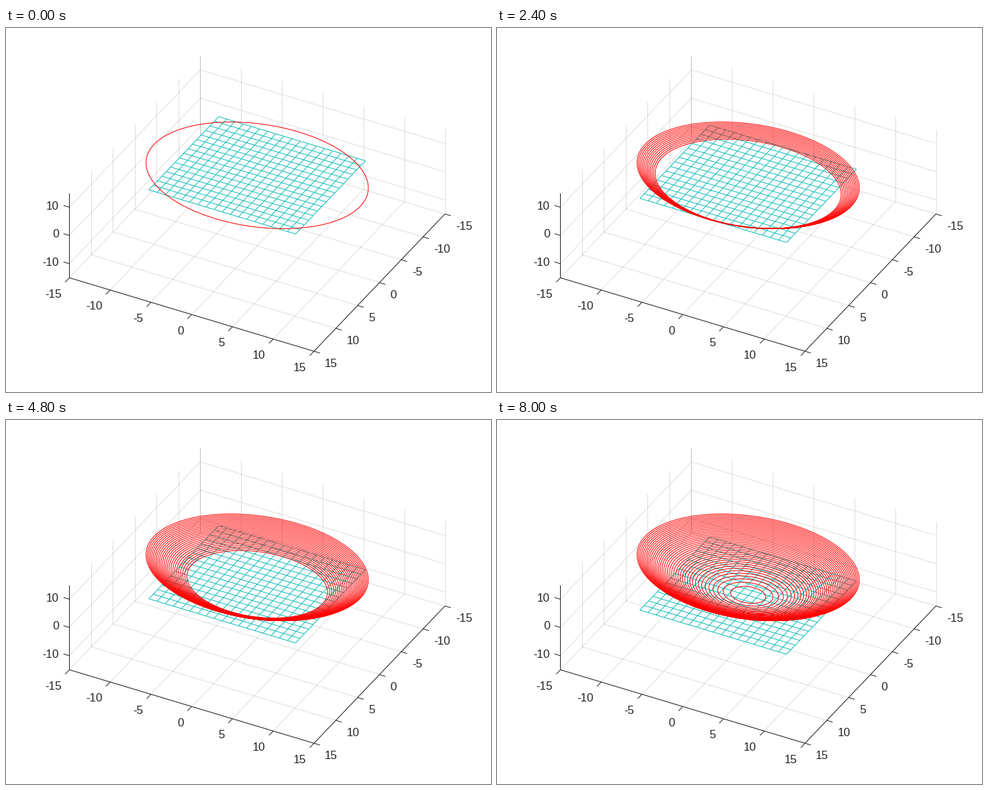
A matplotlib script that plays this animation: 700x525 px, repeating every 8.2 s.

```python
import numpy as np
import matplotlib.pyplot as plt
from matplotlib.animation import FuncAnimation
from matplotlib.collections import LineCollection
from matplotlib.patches import Polygon

W, H, DPI = 700, 525, 100
PX = 72 / DPI
LIM = 15
STEPS = 41
TOP, DZ = 10, 0.25

INK, RED, TEAL = "#262626", "#ff0000", "#12beb9"

# Screen directions of the x, y and z axes, in pixels per unit
ORIGIN = np.array([362.5, 253.2])
EX = np.array([11.767, 3.533])
EY = np.array([-6.3, 6.6])
EZ = np.array([0, -4.07])


def project(x, y, z):
    x, y, z = (np.asarray(v, float)[..., None] for v in (x, y, z))
    return ORIGIN + x * EX + y * EY + z * EZ


def segment(p, q):
    return np.array([project(*p), project(*q)])


fig = plt.figure(figsize=(W / DPI, H / DPI), dpi=DPI, facecolor="white")
ax = fig.add_axes([0, 0, 1, 1])
ax.set_xlim(0, W)
ax.set_ylim(H, 0)
ax.axis("off")


def add_lines(segs, color, width=1.0, **kw):
    lines = LineCollection(segs, colors=color, linewidths=width * PX, **kw)
    ax.add_collection(lines, autolim=False)
    return lines


def label(pos, value, align):
    ax.text(*pos, str(value), ha=align, va="center_baseline", color=INK,
            family="Liberation Sans", fontsize=16.67 * PX, zorder=6)


# Grid on the floor and the two back walls
ticks = range(-LIM, LIM + 1, 5)
zticks = (-10, 0, 10)
grid = []
for t in ticks:
    grid += [
        segment((t, -LIM, -LIM), (t, LIM, -LIM)),
        segment((-LIM, t, -LIM), (LIM, t, -LIM)),
        segment((t, -LIM, -LIM), (t, -LIM, LIM)),
        segment((-LIM, t, -LIM), (-LIM, t, LIM)),
    ]
for t in zticks:
    grid += [
        segment((-LIM, -LIM, t), (-LIM, LIM, t)),
        segment((-LIM, -LIM, t), (LIM, -LIM, t)),
    ]
add_lines(grid, INK, alpha=0.15, zorder=1)

# Rulers, ticks and tick labels
left, near, right = (-LIM, LIM, -LIM), (LIM, LIM, -LIM), (LIM, -LIM, -LIM)
rulers = [segment(left, near), segment(near, right),
          segment(left, (-LIM, LIM, LIM))]
for t in ticks:
    px, py = project(t, LIM, -LIM), project(LIM, t, -LIM)
    rulers += [[px, px + 0.95 * EY], [py, py + 0.72 * EX]]
    label(px + (-11.5, 22.5), t, "right")
    label(py + (15.5, 17), t, "left")
for t in zticks:
    pz = project(-LIM, LIM, t)
    rulers.append([pz, pz - 0.72 * EX])
    label(pz + (-15, -3), t, "right")
add_lines(rulers, INK, zorder=5)

# Cutting plane, at height zero
NX, NY = 9, 8
mesh = np.array(
    [segment((x, -NY, 0), (x, NY, 0)) for x in range(-NX, NX + 1)]
    + [segment((-NX, y, 0), (NX, y, 0)) for y in range(-NY, NY + 1)])
corners = project([-NX, NX, NX, -NX], [-NY, -NY, NY, NY], 0)
sheet = Polygon(corners, closed=True, fc="white", ec="none", zorder=2)
ax.add_patch(sheet)
wires = add_lines(mesh, TEAL, zorder=3)

# Level curves of the paraboloid z = x^2/16 + y^2/9
angle = np.linspace(0, 2 * np.pi, 181)


def level_curve(z):
    r = np.sqrt(z)
    return project(4 * r * np.cos(angle), 3 * r * np.sin(angle), z)


heights = [TOP - DZ * i for i in range(STEPS)]
curves = [level_curve(z) for z in heights]
rings = add_lines([], RED, zorder=4)


def update(i):
    shift = heights[i] * EZ
    sheet.set_xy(corners + shift)
    wires.set_segments(mesh + shift)
    rings.set_segments(curves[:i + 1])
    return sheet, wires, rings


anim = FuncAnimation(fig, update, frames=STEPS, interval=200,
                     repeat=True, repeat_delay=0, blit=False)
plt.show()
```
